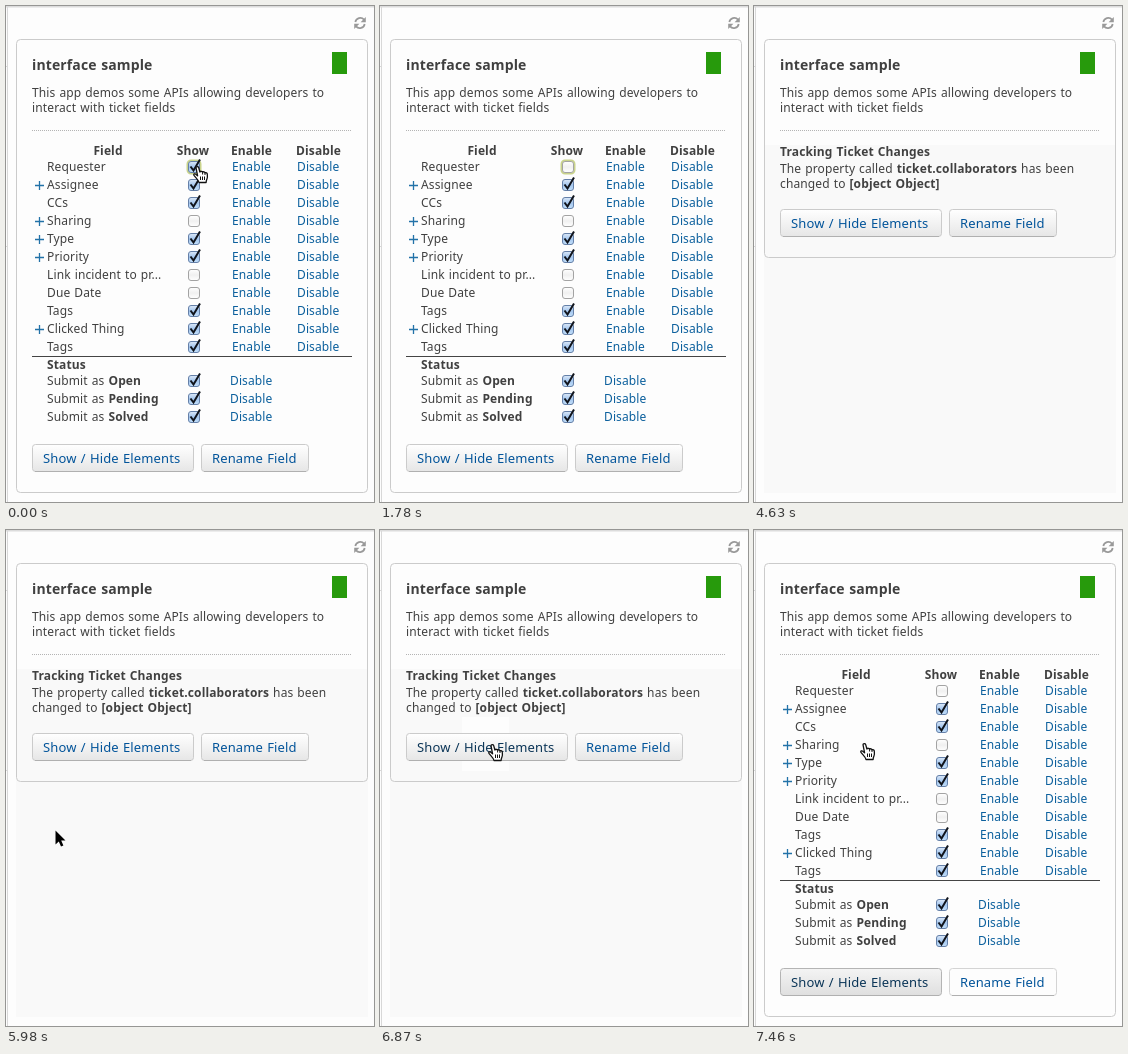
These frames come from a looping animation (368 px wide and 496 px high, 8000 ms). An HTML page:

```html
<!DOCTYPE html>
<html lang="en">
<head>
<meta charset="utf-8">
<style>
  html, body { margin: 0; height: 100%; overflow: hidden; background: #fdfdfd; }
  svg { display: block; }
  text { font: 12px "Noto Sans", "Open Sans", sans-serif; letter-spacing: .13px; word-spacing: .7px; fill: #404040; white-space: pre; }
  .b { font-weight: bold; fill: #404040; }
  .title { font-size: 14px; }
  .mid { text-anchor: middle; }
  .link { fill: #0c609d; }
  .button text { font-size: 13px; fill: #02549a; }
  .button.hover text { fill: #0b3557; }
  .button rect { fill: url(#face); stroke: #cbcbcb; }
  .button path { stroke: #b0b0b0; }
  .button.active rect { fill: url(#activeFace); stroke: #b4b4b4; }
  .button.pressed rect { fill: url(#pressedFace); stroke: #a4a4a4; }
  .button.flat rect { fill: #fdfdfd; stroke: #d4d4d4; }
</style>
</head>
<body>
<svg width="368" height="496" viewBox="0 0 368 496">
  <defs>
    <linearGradient id="face" x2="0" y2="1"><stop stop-color="#fff"/><stop offset="1" stop-color="#e6e6e6"/></linearGradient>
    <linearGradient id="activeFace" x2="0" y2="1"><stop stop-color="#f4f4f4"/><stop offset="1" stop-color="#dfdfdf"/></linearGradient>
    <linearGradient id="pressedFace" x2="0" y2="1"><stop stop-color="#d0d0d0"/><stop offset=".2" stop-color="#e6e6e6"/><stop offset="1" stop-color="#e8e8e8"/></linearGradient>
    <linearGradient id="on" x2="0" y2="1"><stop stop-color="#dce9f8"/><stop offset=".5" stop-color="#a4c6ee"/><stop offset="1" stop-color="#c3e0fb"/></linearGradient>
    <linearGradient id="off" x2="0" y2="1"><stop stop-color="#fff"/><stop offset=".5" stop-color="#f0f0f0"/><stop offset="1" stop-color="#fff"/></linearGradient>
  </defs>

  <path d="M0 .75H368" stroke="#dcdcdc" stroke-width="1.5"/>
  <path d="M1.5 1V496M0 60.5H2M0 240.5H2" stroke="#d8d8d8"/>
  <g fill="none" stroke="#999" stroke-width="1.7">
    <path d="M349.3 16A5 5 0 0 1 358 13.6M358.7 18A5 5 0 0 1 350 20.4"/>
    <path d="M359.8 11v5.2h-5.2zM348.2 23v-5.2h5.2z" fill="#999" stroke="none"/>
  </g>

  <rect id="shade" x="10" y="139" width="352" height="348" fill="#f9f9f9"/>
  <g id="patches" fill="#fdfdfd">
    <rect x="82" y="187" width="47" height="54"/>
    <rect id="strip" x="26" y="197" width="161" height="8"/>
  </g>
  <rect id="panel" x="10.5" y="33.5" width="351" rx="4" fill="none" stroke="#cbcbcb"/>

  <text class="b title" x="26" y="64">interface sample</text>
  <rect x="326" y="46" width="15" height="22" fill="#279a0c"/>
  <text x="26" y="91">This app demos some APIs allowing developers to</text>
  <text x="26" y="106">interact with ticket fields</text>
  <path d="M26 124.5H346" stroke="#b4b4b4" stroke-dasharray="1 1"/>

  <g id="fields"></g>
  <g id="tracking">
    <text class="b" x="26" y="150">Tracking Ticket Changes</text>
    <text x="26" y="167">The property called <tspan class="b">ticket.collaborators</tspan> has been</text>
    <text x="26" y="182">changed to <tspan class="b">[object Object]</tspan></text>
  </g>

  <g id="buttons">
    <g id="showHide" class="button">
      <rect x="26.5" y="203.5" width="161" height="27" rx="3"/>
      <path d="M29 230.5H185"/>
      <text x="37" y="222">Show / Hide Elements</text>
    </g>
    <g id="rename" class="button">
      <rect x="195.5" y="203.5" width="107" height="27" rx="3"/>
      <path d="M198 230.5H300"/>
      <text x="206" y="222">Rename Field</text>
    </g>
  </g>

  <path id="arrow" d="M.5 .5V14.5L3.8 11.5 6 16.5 8.4 15.4 6.2 10.6H10.5Z" stroke="#fff" paint-order="stroke"/>
  <g id="hand" stroke="#111" stroke-width="1.3" stroke-linejoin="round">
    <path fill="#fff" d="M3 1.7C3 .3 5.3 .2 5.7 1.6L6.9 6C7.4 5 9.2 5 9.6 6.2 10.3 5.4 11.8 5.8 12 6.9 13 6.3 14.3 7 14.3 8.3L14.4 11C14.3 13 13.2 13.6 13.1 16.5H6C5.6 14 3 12 1 9.4 .2 8 1.8 7.2 3 8.4L4.6 9.8Z"/>
    <path fill="none" stroke-width="1" d="M7.5 10.5V14M9.5 10.5V14M11.5 10.5V14M9.6 6.2V8.5M12 7V9"/>
  </g>
</svg>
<script>
const $ = id => document.getElementById(id);
const show = (id, on) => $(id).style.display = on ? '' : 'none';
const label = (x, y, text, cls = '') => `<text class="${cls}" x="${x}" y="${y}">${text}</text>`;

const checkbox = (y, checked, id = '') => `
  <g id="${id}" transform="translate(182 ${y})">
    <rect class="glow" x="-.5" y="-.5" width="13" height="13" rx="3.5" fill="none" stroke="#c9d38b" stroke-width="2" display="none"/>
    <rect class="box" x=".5" y=".5" width="11" height="11" rx="2.5" fill="url(#${checked ? 'on' : 'off'})" stroke="${checked ? '#6580a8' : '#a3a3a3'}"/>
    <path class="tick" d="M2.5 5.5L5.5 9.5 12 -1.5" fill="none" stroke="#10141c" stroke-width="2" ${checked ? '' : 'display="none"'}/>
  </g>`;

// "+" marks an expandable row, "-" an unchecked one
const rows = ['Requester', '+Assignee', 'CCs', '+-Sharing', '+Type', '+Priority',
  '-Link incident to pr...', '-Due Date', 'Tags', '+Clicked Thing', 'Tags'];

$('fields').innerHTML =
  [['Field', 102], ['Show', 187], ['Enable', 245.5], ['Disable', 312.5]]
    .map(([name, x]) => label(x, 149, name, 'b mid')).join('') +
  rows.map((row, i) => {
    const y = 165 + 18 * i;
    const plus = row.includes('+') ? `<path d="M29 ${y - 3.5}h9m-4.5-4.5v9" stroke="#2272a8" stroke-width="1.3"/>` : '';
    return plus + label(41, y, row.replace(/^[+-]+/, '')) +
      checkbox(y - 10, !row.includes('-'), i ? '' : 'first') +
      label(226, y, 'Enable', 'link') + label(291, y, 'Disable', 'link');
  }).join('') +
  '<path d="M26 350.5H346" stroke="#444"/>' + label(41, 363, 'Status', 'b') +
  ['Open', 'Pending', 'Solved'].map((state, i) => {
    const y = 379 + 18 * i;
    return label(41, y, `Submit as <tspan class="b">${state}</tspan>`) +
      checkbox(y - 10, true) + label(224, y, 'Disable', 'link');
  }).join('');

// [start, shape, x, y]; the pointer jumps from place to place
const pointer = [
  [0, 'hand', 187, 160], [590, 'hand', 186, 161], [1780, ''],
  [5980, 'arrow', 49, 300], [6120, 'arrow', 86, 222], [6270, 'arrow', 113, 190],
  [6420, 'arrow', 115, 188], [6570, 'arrow', 113, 199], [6720, 'arrow', 117, 210],
  [6870, 'hand', 108, 214], [7160, 'hand', 106, 213]
];

function drawFirstCheckbox(t) {
  const checked = t < 1340, pressed = t >= 1190 && checked;
  const part = name => $('first').querySelector('.' + name);
  part('glow').setAttribute('display', t < 3580 ? 'inline' : 'none');
  part('tick').setAttribute('display', checked ? 'inline' : 'none');
  part('box').setAttribute('fill', pressed ? '#7fa5d6' : `url(#${checked ? 'on' : 'off'})`);
  part('box').setAttribute('stroke', checked ? '#6580a8' : '#a3a3a3');
}

function draw() {
  const t = performance.now() % 8000;
  const tracking = t >= 4630 && t < 7460;
  show('fields', !tracking);
  show('tracking', tracking);
  show('shade', tracking);
  show('patches', tracking && t >= 6270);
  show('strip', t >= 7310);
  $('panel').setAttribute('height', tracking ? 218 : 453);
  $('buttons').setAttribute('transform', `translate(0 ${tracking ? 0 : 235})`);
  const face = t < 7310 ? '' : tracking ? 'pressed' : 'active';
  $('showHide').setAttribute('class', `button ${t >= 6870 ? 'hover' : ''} ${face}`);
  $('rename').setAttribute('class', `button ${t >= 7460 ? 'flat' : ''}`);
  drawFirstCheckbox(t);

  const [, shape, x, y] = pointer.findLast(p => p[0] <= t);
  for (const id of ['arrow', 'hand']) show(id, id === shape);
  if (shape) $(shape).setAttribute('transform', `translate(${x} ${y})`);
  requestAnimationFrame(draw);
}
draw();
</script>
</body>
</html>
```
